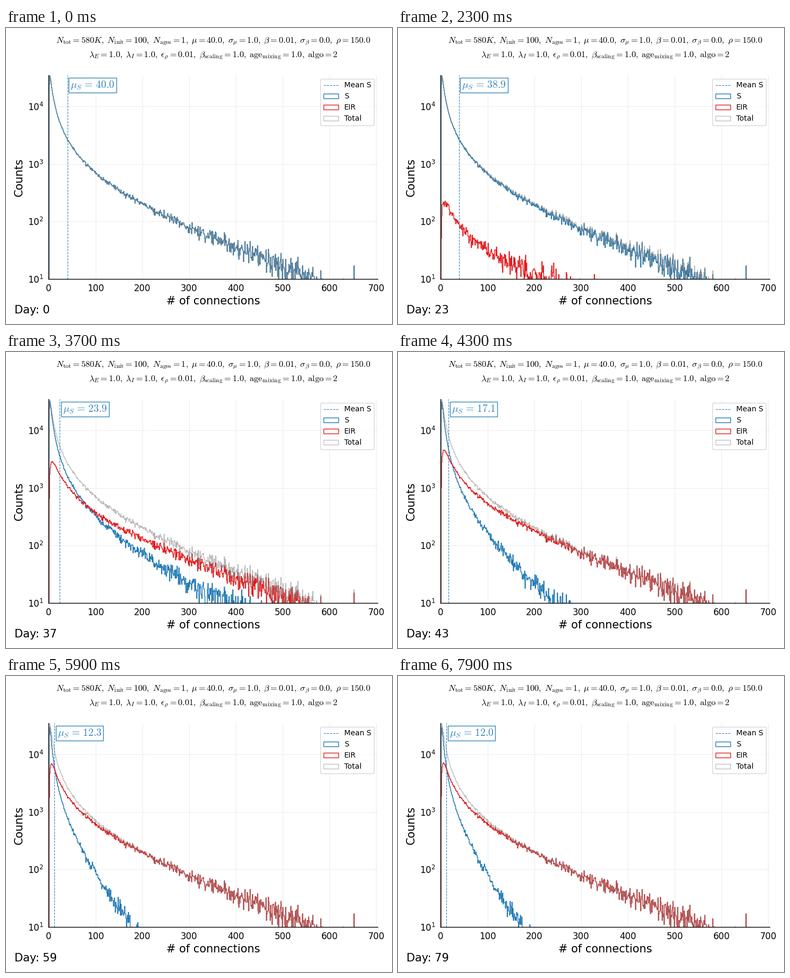
Animation, 727 px wide and 559 px high, one loop 8000 ms. Source, as a matplotlib script:

```python
import numpy as np
import matplotlib.pyplot as plt
from matplotlib.animation import FuncAnimation
from matplotlib.patches import Patch

W, H, DPI = 727, 559, 100
DAYS = 80
BLUE, RED, GRAY = "#1f78b4", "#e31a1c", "#808080"
K_MAX = 800

plt.rcParams["font.family"] = "DejaVu Sans"
rng = np.random.default_rng(7)

# Contact numbers: power law with a soft start and an exponential tail
k = np.arange(K_MAX)
expected = (38200 * (1 - np.exp(-1.07 * k**2)) * (1 + (k / 4.8) ** 2) ** -0.585
            * np.exp(-k / 225 - (k / 680) ** 8))
total = rng.poisson(expected)
total[652] = 17

# One entry per person: number of contacts and a personal threshold
contacts = np.repeat(k, total)
luck = rng.random(contacts.size)


def susceptible(day):
    """Histogram of contacts among those not yet infected."""
    reach = 1 - np.exp(-np.exp(0.2155 * (day - 36.8)))
    scale = 66 + 64 / (1 + np.exp(0.27 * (day - 48.4)))
    spared = 0.48 * np.exp(-10 * k / scale) + 0.52 * np.exp(-k / scale)
    stay = reach * spared + (1 - reach) * np.exp(-k * reach / 600)
    return np.bincount(contacts[luck < stay[contacts]], minlength=K_MAX)


def mean_s(day):
    return 40 - 28 / (1 + np.exp(-0.1836 * (day - 30.76))) ** 2


fig = plt.figure(figsize=(W / DPI, H / DPI), dpi=DPI, facecolor="white")
ax = fig.add_axes([80.4 / W, 85 / H, 620 / W, 385 / H])
ax.set_yscale("log")
ax.set_xlim(0, 703.4)
ax.set_ylim(10, 35080)
ax.minorticks_off()
ax.tick_params(length=0, pad=7, labelsize=12)
ax.tick_params(axis="x", pad=6.4)
ax.set_axisbelow(True)
ax.grid(color="#b0b0b0", alpha=0.22, lw=0.8)
ax.spines[["top", "right"]].set_visible(False)
ax.spines[["left", "bottom"]].set_linewidth(1)
ax.set_xlabel("# of connections", fontsize=15, labelpad=3.4)
ax.set_ylabel("Counts", fontsize=15)


def px_text(x, y, text, **style):
    return fig.text(x / W, 1 - y / H, text, va="baseline", **style)


def sub(name, index):
    return name + r"_{\mathrm{" + index + "}}"


def heading(y, *terms):
    px_text(390.5, y, "$" + r",\;".join(terms) + "$", ha="center",
            fontsize=11.75, math_fontfamily="cm")


heading(29, sub("N", "tot") + "=580K", sub("N", "init") + "=100",
        sub("N", "ages") + "=1", r"\mu=40.0", r"\sigma_{\mu}=1.0",
        r"\beta=0.01", r"\sigma_{\beta}=0.0", r"\rho=150.0")
heading(55.5, r"\lambda_{E}=1.0", r"\lambda_{I}=1.0", r"\epsilon_{\rho}=0.01",
        sub(r"\beta", "scaling") + "=1.0",
        sub(r"\mathrm{age}", "mixing") + "=1.0", r"\mathrm{algo}=2")
day_text = px_text(16.3, 539.4, "", fontsize=15)

mean_line = ax.axvline(40, color=BLUE, ls="--", lw=0.8, alpha=0.9, zorder=1.5,
                       label="Mean S")
edges = np.arange(K_MAX + 1)
styles = {
    "S": dict(ec=BLUE, lw=1),
    "EIR": dict(ec=RED, lw=1),
    "Total": dict(ec=GRAY, lw=0.8, alpha=0.6),
}
steps = {name: ax.stairs(total, edges, zorder=2 + i / 10, **style)
         for i, (name, style) in enumerate(styles.items())}
mean_text = ax.text(
    0, 0.938, "", transform=ax.get_xaxis_transform(), va="baseline",
    color=BLUE, alpha=0.9, fontsize=14.1, math_fontfamily="cm",
    bbox=dict(boxstyle="square,pad=0.15", fc="white", ec=BLUE, lw=1, alpha=0.9))

proxies = [Patch(fill=False, label=name, **style) for name, style in styles.items()]
ax.legend(handles=[mean_line, *proxies], loc="upper right", fontsize=10)


def update(day):
    s = susceptible(day)
    steps["S"].set_data(s)
    steps["EIR"].set_data(total - s)
    mu = mean_s(day)
    mean_line.set_xdata([mu, mu])
    mean_text.set_x(mu + 6.3)
    mean_text.set_text(rf"$\mu_{{S}}\hspace{{0.12}}=\hspace{{0.12}}{mu:.1f}$")
    day_text.set_text(f"Day: {day}")


anim = FuncAnimation(fig, update, frames=DAYS, interval=100, init_func=lambda: None,
                     repeat=True, repeat_delay=0)
plt.show()
```
